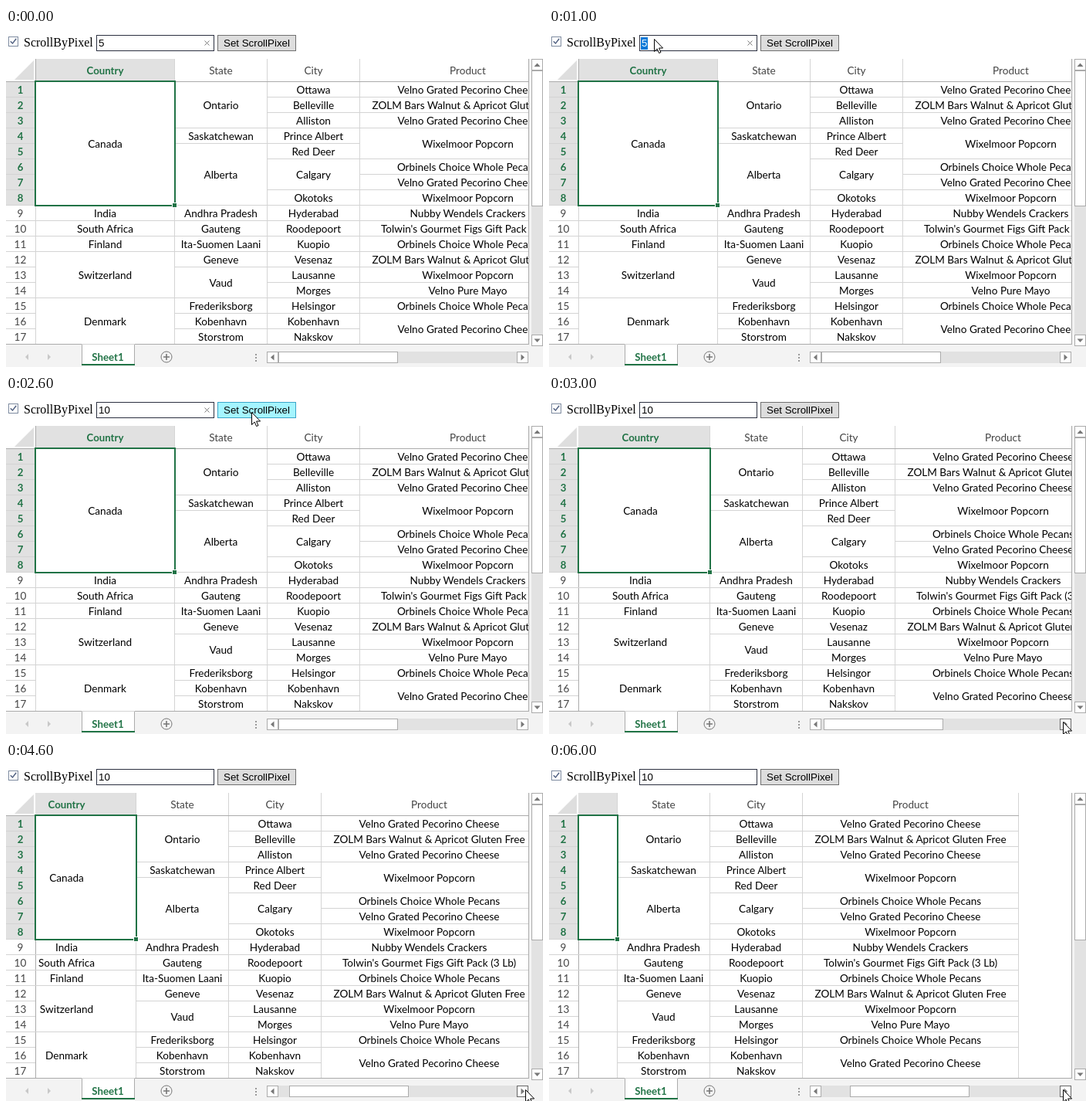
An HTML page that plays this animation: 696x439 px, repeating every 7 s.

```html
<!DOCTYPE html>
<html lang="en">
<head>
<meta charset="utf-8">
<title>Scroll by pixel</title>
<style>
  html, body { margin: 0; width: 100%; height: 100%; overflow: hidden; background: #fff; }
  svg { display: block; font: 13.6px Lato, sans-serif; }
  .line { fill: none; stroke: #d4d4d4; shape-rendering: crispEdges; }
  .edge { fill: none; stroke: #ababab; shape-rendering: crispEdges; }
  .mid { text-anchor: middle; }
  .head { fill: #444; }
  .on { fill: #217346; font-weight: bold; font-size: 13.25px; }
  .ui { font: 13.333px "Liberation Sans", Arial, sans-serif; }
  .label { font: 16px "Liberation Serif", "Times New Roman", serif; }
</style>
</head>
<body>
<svg id="stage" width="696" height="439" viewBox="0 0 696 439">
  <defs>
    <clipPath id="view"><rect x="38" y="40" width="639" height="370"/></clipPath>
  </defs>
</svg>
<script>
const stage = document.getElementById('stage');
const GREEN = '#217346', ROW = 20, TOP = 69;

function add(parent, tag, attrs, text) {
  const el = document.createElementNS('http://www.w3.org/2000/svg', tag);
  for (const key in attrs) el.setAttribute(key, attrs[key]);
  if (text) el.textContent = text;
  return parent.appendChild(el);
}
const rect = (p, x, y, width, height, fill, more) =>
  add(p, 'rect', { x, y, width, height, fill, ...more });
const box = (p, x, y, w, h, fill, stroke) =>
  rect(p, x + .5, y + .5, w - 1, h - 1, fill, { stroke });
const path = (p, d, fill, more) => add(p, 'path', { d, fill, ...more });
const line = (p, d, cls = 'line') => add(p, 'path', { d, class: cls });
const text = (p, x, y, cls, str) => add(p, 'text', { x, y, class: cls }, str);

// Toolbar
box(stage, 3, 11, 13, 13, '#fff', '#7e8ba0');
path(stage, 'M5.8 17.3 8.5 20 13.3 13.8', 'none', { stroke: '#4f5f80', 'stroke-width': 1.4 });
text(stage, 23, 24, 'label', 'ScrollByPixel');
box(stage, 117, 9, 153, 21, '#fff', '#2b3040');
const mark = rect(stage, 119, 12, 9, 16, '#0078d7');
const value = text(stage, 120, 24, 'ui', '5');
const clear = path(stage, 'M257.5 16.5l6 6m0-6l-6 6', 'none', { stroke: '#777' });
const button = box(stage, 274, 9, 102, 21, '#ddd', '#707070');
text(stage, 282, 24, 'ui', 'Set ScrollPixel');

// Row headers
path(stage, 'M36 42V67H11Z', '#dedede');
for (let i = 1; i <= 17; i++) {
  const y = TOP + ROW * i, on = i < 9;
  if (on) rect(stage, 0, y - 19, 38, 19, '#e1e1e1');
  line(stage, `M0 ${y + .5}H38`);
  text(stage, 18.5, y - 4, on ? 'mid on' : 'mid head', String(i));
}
line(stage, `M0 ${TOP + .5}H38`, 'edge');
line(stage, 'M38.5 40V410', 'edge');

// Cells: text, with a leading digit for the number of merged rows
const CHEESE = 'Velno Grated Pecorino Cheese', BARS = 'ZOLM Bars Walnut & Apricot Gluten Free',
  CORN = 'Wixelmoor Popcorn', NUTS = 'Orbinels Choice Whole Pecans';
const columns = [
  ['Country', 180, ['8Canada', 'India', 'South Africa', 'Finland', '3Switzerland', '3Denmark']],
  ['State', 120, ['3Ontario', 'Saskatchewan', '4Alberta', 'Andhra Pradesh', 'Gauteng',
    'Ita-Suomen Laani', 'Geneve', '2Vaud', 'Frederiksborg', 'Kobenhavn', 'Storstrom']],
  ['City', 120, ['Ottawa', 'Belleville', 'Alliston', 'Prince Albert', 'Red Deer', '2Calgary',
    'Okotoks', 'Hyderabad', 'Roodepoort', 'Kuopio', 'Vesenaz', 'Lausanne', 'Morges',
    'Helsingor', 'Kobenhavn', 'Nakskov']],
  ['Product', 280, [CHEESE, BARS, CHEESE, '2' + CORN, NUTS, CHEESE, CORN, 'Nubby Wendels Crackers',
    "Tolwin's Gourmet Figs Gift Pack (3 Lb)", NUTS, BARS, CORN, 'Velno Pure Mayo', NUTS,
    '2' + CHEESE]]
];
const view = add(stage, 'g', { 'clip-path': 'url(#view)' });
const grid = add(view, 'g', {});
let x = 38;
columns.forEach(([name, width, cells], c) => {
  const cx = x + width / 2 + .5;
  if (!c) rect(grid, x + 1, 40, width, 29, '#e1e1e1');
  line(grid, `M${x + width + .5} 40V${TOP}`);
  text(grid, cx, 60, c ? 'mid head' : 'mid on', name);
  let y = TOP;
  for (const cell of cells) {
    const [, span, label] = cell.match(/^(\d?)(.*)$/), h = ROW * (span || 1);
    rect(grid, x + .5, y + .5, width, h, 'none', { class: 'line' });
    text(grid, cx, y + h / 2 + 6, 'mid', label);
    y += h;
  }
  x += width;
});
line(grid, `M38 ${TOP + .5}H${x + 1}`, 'edge');

// Selection: its left edge stays at the edge of the view
const frame = rect(stage, 38, 69, 181, 161, 'none', { stroke: GREEN, 'stroke-width': 2 });
const handle = add(stage, 'g', {});
rect(handle, 215, 226, 7, 7, '#fff');
rect(handle, 216, 227, 5, 5, GREEN);

// Vertical scroll bar and tab strip
rect(stage, 678, 40, 18, 399, '#f3f3f3');
rect(stage, 0, 410, 696, 29, '#f3f3f3');
line(stage, 'M0 409.5H98M167 409.5H677.5V40', 'edge');
rect(stage, 681, 40, 15, 372, '#e2e2e2');
box(stage, 681, 40, 15, 15, '#fff', '#ababab');
path(stage, 'M684.5 50H692.5L688.5 45.5Z', '#777');
box(stage, 681, 55, 15, 176, '#fff', '#ababab');
box(stage, 681, 397, 15, 15, '#fff', '#ababab');
path(stage, 'M684.5 402.5H692.5L688.5 407Z', '#777');

path(stage, 'M29 422V430L25 426ZM54 422V430L58 426Z', '#c8c8c8');
rect(stage, 98, 410, 69, 27, '#fff');
line(stage, 'M98.5 410V437M166.5 410V437', 'edge');
rect(stage, 98, 435, 69, 2, GREEN);
text(stage, 132, 431, 'mid on', 'Sheet1');
add(stage, 'circle', { cx: 208, cy: 426, r: 7, fill: 'none', stroke: '#777' });
path(stage, 'M204 426H212M208 422V430', 'none', { stroke: '#777', 'stroke-width': 1.6 });
for (const y of [422, 426, 430]) rect(stage, 323, y, 2, 2, '#999');

// Horizontal scroll bar
rect(stage, 338, 419, 339, 15, '#e2e2e2');
box(stage, 338, 419, 15, 15, '#fff', '#ababab');
path(stage, 'M347.5 422.5V430.5L343 426.5Z', '#777');
const thumb = box(stage, 353, 419, 155, 15, '#fff', '#ababab');
const next = box(stage, 662, 419, 15, 15, '#fff', '#ababab');
path(stage, 'M667.5 422.5V430.5L672 426.5Z', '#777');

const cursor = path(stage, 'M.5 .5V16.5L4.2 13 6.6 18.5 9 17.5 6.6 12H11.6Z', '#fff',
  { stroke: '#000' });

// One step per second: scroll offset, typed value, pointer x, pointer y
const steps = [
  [0, '5'],
  [0, '5', 136, 14],
  [0, '10', 318, 22],
  [10, '10', 666, 423],
  [50, '10', 673, 424],
  [70, '10', 674, 423],
  [130, '10', 666, 424]
];
const show = (el, on) => el.setAttribute('visibility', on ? 'visible' : 'hidden');
let last = -1;

function draw(now) {
  const i = Math.floor(now / 1000) % steps.length;
  if (i !== last) {
    last = i;
    const [scroll, typed, px, py] = steps[i];
    const hover = i === 2, move = `translate(${-scroll} 0)`;
    grid.setAttribute('transform', move);
    handle.setAttribute('transform', move);
    frame.setAttribute('width', 181 - scroll);
    thumb.setAttribute('x', 353.5 + Math.round(scroll * .285));
    value.textContent = typed;
    value.setAttribute('fill', i === 1 ? '#fff' : '#000');
    show(mark, i === 1);
    show(clear, i < 3);
    button.setAttribute('fill', hover ? '#a5f5ff' : '#ddd');
    button.setAttribute('stroke', hover ? '#3aa5c9' : '#707070');
    next.setAttribute('stroke', i > 2 ? '#666' : '#ababab');
    show(cursor, i > 0);
    if (i) cursor.setAttribute('transform', `translate(${px} ${py})`);
  }
  requestAnimationFrame(draw);
}
draw(performance.now());
</script>
</body>
</html>
```
